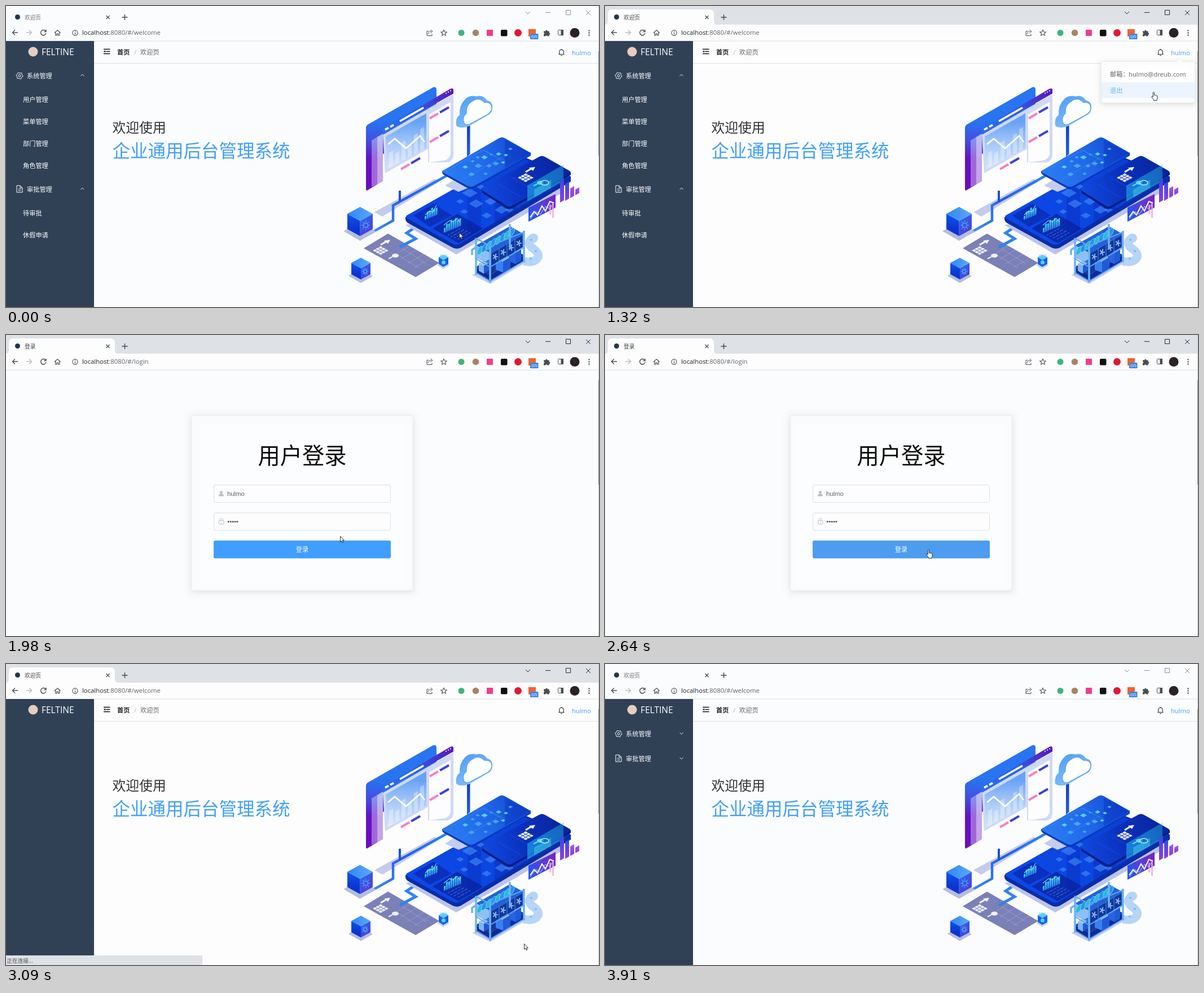
An HTML page with a canvas for the animation above (4010 ms loop, 1051 by 533 pixels).

```html
<!DOCTYPE html>
<html lang="zh-CN">
<head>
<meta charset="utf-8">
<title>欢迎页</title>
<style>
html, body { margin: 0; width: 100%; height: 100%; overflow: hidden; background: #fdfdfd; }
canvas { display: block; }
</style>
</head>
<body>
<canvas id="stage" width="1051" height="533"></canvas>
<script>
const ctx = document.getElementById('stage').getContext('2d');
const LOOP = 4010;
const CJK = '"Noto Sans CJK SC","Noto Sans CJK",sans-serif';
const LATIN = '"Open Sans","Noto Sans",sans-serif';
const ARIAL = '"Liberation Sans",sans-serif';
const USER = 'hulmo', MAIL = 'hulmo@dreub.com', BRAND = 'FELTINE';

// Pointer stops: time, x, y, shape (a = arrow, h = hand, '' = hidden)
const POINTER = [
  [0, 803, 401, 'a'], [150, 868, 330, 'a'], [280, 1031, 200, 'a'], [400, 904, 105, 'a'],
  [540, 965, 92, 'a'], [660, 1010, 80, 'h'], [940, 1004, 104, 'h'], [1080, 995, 118, 'h'],
  [1200, 982, 138, 'h'], [1320, 968, 152, 'h'], [1470, 962, 156, 'a'], [1620, 905, 205, 'a'],
  [1740, 800, 275, 'a'], [1860, 680, 330, 'a'], [1980, 592, 356, 'a'], [2100, 569, 380, 'h'],
  [2250, 573, 388, 'h'], [2400, 572, 386, 'h'], [2520, 570, 382, 'h'], [2640, 569, 380, 'h'],
  [2790, 602, 396, 'a'], [2940, 878, 468, 'a'], [3090, 918, 495, 'a'], [3210, 930, 517, 'a'],
  [3330, 0, 0, '']
];
const BUTTON = [[0, '#409eff'], [2100, '#66b1ff'], [2520, '#3a8ee6'], [2640, '#4c9cef'], [2790, '#409eff']];
const at = (table, t) => table.filter(row => row[0] <= t).pop();

function path(d, fill, stroke, width = 1) {
  const p = new Path2D(d);
  if (fill) { ctx.fillStyle = fill; ctx.fill(p); }
  if (stroke) { ctx.strokeStyle = stroke; ctx.lineWidth = width; ctx.stroke(p); }
}
const line = (d, color, width) => path(d, null, color, width);
function rect(x, y, w, h, fill, r = 0, stroke) {
  ctx.beginPath();
  ctx.roundRect(x, y, w, h, r);
  if (fill) { ctx.fillStyle = fill; ctx.fill(); }
  if (stroke) { ctx.strokeStyle = stroke; ctx.lineWidth = 1; ctx.stroke(); }
}
function ellipse(x, y, rx, ry, turn, fill, stroke, width = 1) {
  ctx.beginPath();
  ctx.ellipse(x, y, rx, ry, turn, 0, 7);
  if (fill) { ctx.fillStyle = fill; ctx.fill(); }
  if (stroke) { ctx.strokeStyle = stroke; ctx.lineWidth = width; ctx.stroke(); }
}
const circle = (x, y, r, fill, stroke, width) => ellipse(x, y, r, r, 0, fill, stroke, width);
function grad(x0, y0, x1, y1, ...colors) {
  const g = ctx.createLinearGradient(x0, y0, x1, y1);
  colors.forEach((c, i) => g.addColorStop(i / (colors.length - 1), c));
  return g;
}
function text(s, x, y, size, color, font = LATIN, weight = 400, align = 'left') {
  ctx.font = `${weight} ${size}px ${font}`;
  ctx.textAlign = align;
  ctx.fillStyle = color;
  ctx.fillText(s, x, y);
}
// Chinese text placed by its vertical centre
const han = (s, x, cy, size, color, weight, align) =>
  text(s, x, cy + size * 0.38, size, color, CJK, weight, align);
// Isometric tile from its left corner
const tile = (x, y, a, b, fill) =>
  path(`M${x} ${y}l${a} ${-a * .58}l${b} ${b * .58}l${-a} ${a * .58}z`, fill);
const pill = (x, y, w, color) => line(`M${x} ${y}l${w} ${-w * .58}`, color, 4);
function glow(blur, y, alpha, draw) {
  ctx.save();
  ctx.shadowColor = `rgba(0,0,0,${alpha})`;
  ctx.shadowBlur = blur;
  ctx.shadowOffsetY = y;
  draw();
  ctx.restore();
}

function browser(focused, bg, title, url) {
  const ink = focused ? '#24272b' : '#8b8f94', icon = '#4a4d51';
  rect(0, 0, 1051, 62, bg);
  if (focused) {
    rect(0, 0, 1051, 33, '#dee1e6');
    path('M0 33Q5 33 5 27V14Q5 6 13 6H185Q193 6 193 14V27Q193 33 199 33Z', bg);
  }
  circle(20.5, 19.5, 4.5, '#24364b');
  han(title, 33, 20, 9.7, focused ? '#3c4043' : '#6b6f74');
  line('M177.5 17l6 6m0-6l-6 6', '#44474b', 1.2);
  line('M205.5 20h10m-5-5v10', '#44474b', 1.4);
  line('M921 10l4 4 4-4M956 11.5h9M992.5 7.5h8v8h-8zM1028 8l8 8m0-8l-8 8', ink, 1);

  line('M21 47H11.5M16 42.5L11.5 47l4.5 4.5', icon, 1.4);
  line('M36 47h9.5M41 42.5l4.5 4.5-4.5 4.5', '#babcbe', 1.4);
  line('M70.2 44.5A4.7 4.7 0 1 0 71 48M71 42v3.6h-3.6', icon, 1.4);
  line('M86 47.5l5.3-4.7 5.3 4.7M87.8 46.5V52h2.3v-3h2.4v3h2.3v-5.5', icon, 1.2);
  circle(122.5, 47.5, 4.6, null, icon, 1.1);
  line('M122.5 47v3.2M122.5 44.8v1.2', icon, 1.2);
  text('localhost', 135, 51.3, 11.3, '#202124');
  const hostWidth = ctx.measureText('localhost').width;
  text(':8080/#/' + url, 135 + hostWidth, 51.3, 11.3, '#5f6368');

  line('M749 44.5h-3v8h9v-3M748 50q0-5 5-5h1M752.5 42l3.5 3-3.5 3', icon, 1);
  line('M776 42.4l1.5 3.4 3.7.3-2.8 2.4.9 3.6-3.3-2-3.3 2 .9-3.6-2.8-2.4 3.7-.3z', icon, 1.1);
  circle(807, 47.5, 5.5, '#3fb37f');
  circle(832.5, 47.5, 5.8, '#a88466');
  rect(852, 42, 11, 11, '#ef3d8c', 1);
  rect(877, 42, 11.5, 11.5, '#111', 2);
  circle(907.5, 47.5, 6.5, '#e01834');
  rect(926, 41, 13, 13, '#f2632a');
  rect(929, 49, 14.5, 10, '#3d86e8', 1);
  text('on', 936.2, 57, 8.5, '#fff', LATIN, 400, 'center');
  path('M953 44.5h3.2a1.7 1.7 0 1 1 3.4 0h3v3a1.7 1.7 0 1 1 0 3.4v2.6h-3.3a1.7 1.7 0 0 0-3.3 0h-3v-3.2a1.7 1.7 0 0 0 0-3.2z', icon);
  rect(978.5, 42.5, 9, 9, null, 1, icon);
  rect(983.5, 42, 4.5, 10, icon);
  circle(1008, 47.5, 8.5, '#2b2226');
  for (const y of [43.5, 47.5, 51.5]) circle(1033.5, y, 1.2, icon);
  rect(0, 61.5, 1051, 1, '#dcdfe4');
}

function monitor() {
  path('M638 215Q638 212 641 210L757 144Q763 142 763 149V210L668 262V310L641 326Q638 328 638 324Z',
    grad(0, 205, 0, 300, '#2874f1', '#4350e2', '#6214c6', '#6a0fc0'));
  path('M648 238L658 232V316L648 321Z', 'rgba(255,255,255,.36)');
  path('M658 232L668 226V310L658 316Z', 'rgba(255,255,255,.62)');
  path('M668 228L793 156V265Q792 275 782 277H748V253L672 296Z', '#cfd9f6');
  path('M750 192L788 170V262Q786 270 779 273L750 277Z', '#fdfdff');
  path('M668 217L787 147Q793 144 793 149V155L668 226Z', grad(668, 220, 793, 150, '#2a70f0', '#2f5ae6', '#5c14b8'));
  line('M672 219l6-3.4M681 214l6-3.4M698 204l42-24', '#fff', 3.6);
  for (let i = 0; i < 3; i++) circle(780 + i * 4, 154.5 - i * 2.2, 1.1, '#fff');
  path('M673 231L745 190V251L675 290Z', grad(710, 205, 710, 285, '#68a2f5', '#a8c9f9', '#d3e4fc'));
  [27, 20, 33, 22, 34, 39].forEach((h, i) => {
    const x = 679 + i * 11, y = 287 - i * 6;
    path(`M${x} ${y}v${-h}l7-4v${h}z`, 'rgba(255,255,255,.32)');
  });
  line('M677 245L689 235L709 252L734 230L742 241', '#fff', 2.6);
  for (const [x, y] of [[751, 199], [751, 241], [700, 289]]) {
    pill(x, y, 15, '#f57fbd');
    pill(x + 18, y - 10.5, 16, '#3b3fd6');
  }
}

function cloud() {
  path('M817 212h5.5V262L817 267Z', grad(817, 212, 823, 267, '#123fc4', '#1f62ea'));
  path('M798 212Q796 198 804 193Q803 176 813 166Q820 157 834 160Q846 157 852 167Q863 169 862 181Q862 190 853 194L820 213Q806 218 798 212Z',
    grad(800, 165, 830, 215, '#4c9df6', '#86c2fb'));
  path('M811 205Q809 196 816 190Q815 175 826 169Q838 160 848 171Q861 169 861 181Q860 189 850 194L822 209Q813 213 811 205Z', '#fdfeff', '#4b9af5', 1.1);
}

function cube(x, y, r, h) {
  const s = r * .55;
  tile(x - r - r * .3, y + h + s * .3, r * 1.25, r * 1.3, '#b5bddf');
  path(`M${x - r} ${y}L${x} ${y + s}V${y + s + h}L${x - r} ${y + h}Z`, grad(x, y, x, y + h, '#0d56ea', '#0a35d0'));
  path(`M${x + r} ${y}L${x} ${y + s}V${y + s + h}L${x + r} ${y + h}Z`, grad(x, y, x + r, y + h, '#2a6df0', '#4a3fd8'));
  path(`M${x - r} ${y}L${x} ${y - s}L${x + r} ${y}L${x} ${y + s}Z`, grad(x - r, y, x + r, y, '#2f86f4', '#5aaafa'));
  const gx = x + r * .45, gy = y + h * .75, k = r / 24;
  circle(gx, gy, 4.2 * k, null, '#4fb5f5', 1.3);
  for (let i = 0; i < 8; i++) {
    const a = i * Math.PI / 4, c = Math.cos(a) * k, d = Math.sin(a) * k;
    line(`M${gx + 5 * c} ${gy + 6 * d}L${gx + 8 * c} ${gy + 9 * d}`, '#4fa8f5', 1.2);
  }
}

// Grid, arrow and magnifier signs shared by two plates
function signs(x, y, lens) {
  for (let r = 0; r < 3; r++)
    for (let c = 0; c < 3; c++) tile(x + (c + r) * 5, y + (r - c) * 2.7, 4, 4, '#f2f4ff');
  line(`M${x + 14} ${y - 10}l10-6`, '#fff', 3);
  path(`M${x + 20} ${y - 17.5}l11-1.5-4 7z`, '#fff');
  ellipse(x + 40, y + 9, 6, 3.4, 0, lens);
  line(`M${x + 35} ${y + 11}l-7 3.5`, lens, 2);
}

function plates() {
  path('M708 388L798 440L985 331V314Z', '#bcc4ea');
  path('M708 374L905 262L1001 302V311L806 428Q798 432 790 427L712 384Q707 380 708 374Z', '#0a2da8');
  path('M710 371L900 264L1000 301L806 420Q798 425 790 420L711 376Q708 373 710 371Z', grad(710, 372, 1000, 300, '#0d48e8', '#0b46e0', '#0a36c6'));
  path('M722 371L758 350L790 371L751 391Z', '#0a30bc');
  path('M756 394L800 368L846 394L802 420Z', '#092bb0');
  path('M818 331L842 318V396L818 410Z', 'rgba(8,30,160,.28)');
  path('M866 320L905 335V360L866 383Z', 'rgba(8,30,160,.3)');
  for (const [x, y, a] of [[808, 331, 14], [833, 320, 8], [820, 350, 13], [848, 346, 11], [866, 361, 12], [843, 371, 9], [798, 346, 7], [884, 361, 8], [805, 364, 7]])
    tile(x, y, a, a, 'rgba(75,150,250,.55)');

  // Small glowing charts
  for (const [x, y, n, h] of [[742, 379, 6, 6], [776, 402, 8, 8]]) {
    for (let i = 0; i < n; i++) {
      const t = h + 7 * Math.sin(i * 3.1 / n) + (i % 2) * 3, bx = x + i * 3.9, by = y - i * 1.6;
      path(`M${bx} ${by}v${-t}l3-1.7v${t}z`, grad(bx, by - t, bx, by, '#45d3ee', '#2a7fe6'));
    }
  }
  line('M743 370l8-7 5 2 7-12M776 388l10-8 6 2 8-6 5 7', '#7fe6f5', 1.1);
  ctx.setLineDash([4, 2, 7, 2]);
  line('M783 406l22-12M788 409l24-13M794 411l24-13M801 413l22-12', 'rgba(160,190,255,.5)', 1);
  ctx.setLineDash([]);

  // Right plate
  path('M843 322L892 352L1001 294V299L897 358Q892 361 887 358L844 331Z', '#061d84');
  path('M845 321L945 267Q950 264 955 267L999 292Q1002 295 999 297L896 354Q892 356 888 354L845 327Q842 324 845 321Z', grad(848, 330, 990, 290, '#1148de', '#0a30bc', '#09259c'));
  line('M872 315l40 23M895 303l40 23', 'rgba(60,120,250,.3)', 1);
  path('M924 318L988 281V310L924 346Z', grad(924, 346, 988, 281, 'rgba(30,180,240,.62)', 'rgba(40,190,230,.4)'));
  path('M936 325l30-17v14l-30 17z', 'rgba(70,215,240,.45)');
  signs(907, 304, '#5fd9ee');
  ellipse(955, 313, 7, 4, 0, 'rgba(20,90,200,.5)', '#a5f0fa', 1.5);

  // Upper plate
  path('M778 318L797 306L822 321L802 329Z', '#c4ccef');
  path('M773 292L824 317L930 259V265L830 323Q825 326 819 323L776 299Q772 296 773 292Z', '#0a39bd');
  path('M775 291L874 234Q879 231 884 234L928 259Q931 262 928 264L829 319Q824 321 819 319L775 295Q772 293 775 291Z', grad(780, 300, 930, 255, '#2b7cf2', '#2068ea', '#0f44cc'));
  path('M884 236L928 261L884 287Z', 'rgba(8,40,180,.35)');
  line('M790 287l56 -32 40 20M812 306l66-38M846 255l33 19', 'rgba(90,170,255,.35)', 1);
  const tiles = [[809, 285, 5], [819, 298, 6], [830, 283, 7], [842, 268, 6], [851, 283, 5], [862, 279, 6], [868, 262, 5], [832, 268, 4], [846, 297, 4], [882, 264, 4], [857, 263, 3], [823, 275, 4], [877, 277, 4], [890, 253, 4]];
  tiles.forEach(([x, y, a], i) => tile(x, y, a, a, i % 3 ? '#45a4f6' : '#4fd2f3'));
}

function sideCharts() {
  [[982, 307, 39], [991, 313, 30], [1000, 321, 17], [1009, 323, 10]].forEach(([x, y, h], i) =>
    path(`M${x} ${y + 2}l7-4v${h}l-7 4z`, grad(x, y, x, y + h, i > 1 ? '#9a55e8' : '#3a48e4', '#8b3fe0')));
  path('M926 357L974 333V357L926 382Z', grad(926, 370, 974, 340, '#2157ee', '#5540dc', '#7a20c8'));
  line('M929 374l7-10 6 6 8-16 6 9 8-17 7 3', '#fff', 2);
  line('M929 377l10-13 8 5 9-14 8 4 7-12', 'rgba(190,205,255,.8)', 1.2);
  path('M963 352h3v17h-3zM968 350h3v25h-3z', 'rgba(242,166,218,.8)');
}

function links() {
  path('M653 365L760 306L768 311L667 373Z', '#c4cbec');
  line('M643 404L686 380V353L782 300', grad(643, 400, 782, 300, '#3a90f8', '#2360e4', '#2b84f4'), 4.5);
  line('M698 327V347', '#1d50d8', 4);
  path('M634 429L677 403L768 455L726 480Z', '#7b80b6');
  line('M688 441l43-25M700 448l39-23M712 456l41-24M724 463l38-22M703 430l42 26M690 438l42 26M715 422l42 26', 'rgba(220,225,255,.28)', 1);
  signs(650, 433, '#eef0ff');
  line('M698 427L726 412L710 402L728 390', '#2f82f2', 5);
}

function rack() {
  line('M935 410Q922 418 932 428Q950 440 940 449Q933 455 918 452', '#b7d4f9', 15);
  circle(935, 411, 8, '#b7d4f9');
  for (const [x, y] of [[931, 414], [939, 434], [930, 447]]) circle(x, y, 1.8, '#4fc8f2');
  path('M826 476L858 492L925 452L918 444Z', '#c3cdf0');
  path('M833 462L858 476V488L833 473ZM858 476L918 441V452L858 488Z', '#0b2c96');
  path('M833 462L893 428L918 441L858 476Z', '#15389f');
  // Boxes on the shelf
  for (const [x, y, w, h, c] of [[838, 456, 9, 13, '#7fb4f8'], [868, 446, 13, 21, '#3a80f0'], [893, 432, 10, 20, '#2b62e4']]) {
    path(`M${x} ${y}l${w} 5v${h}l${-w} -5z`, c);
    path(`M${x + w} ${y + 5}l${w} -6v${h}l${-w} 6z`, '#1f5ad8');
    tile(x, y, w, w * .9, '#9ccafa');
  }
  path('M833 424L893 390L918 404L860 438Z', '#2263da');
  path('M833 424L860 438V459L833 446Z', 'rgba(70,150,240,.6)');
  path('M860 438L918 404V426L860 459Z', '#10379c');
  for (let i = 0; i < 8; i++)
    ellipse(840 + i * 8, 433 - i * 4.6, 3.8, 8.5, .5, i % 2 ? '#2a8fec' : '#22bcd6', '#79dcf2');
  for (let i = 0; i < 4; i++) {
    const x = 867 + i * 14, y = 444 - i * 8;
    for (let k = 0; k < 5; k++) {
      const a = k * 1.257;
      line(`M${x} ${y}l${4.8 * Math.cos(a)} ${5.8 * Math.sin(a)}`, '#8fbcf6', 1.9);
    }
    line(`M${x + 7} ${y - 15}v22`, '#4f92f2', 1);
  }
  line('M826 441V432L833 427M833 411V476M858 425V490M918 398V454M893 386V430', '#6eb2f6', 3.5);
  line('M832 411L858 425L919 400M832 447L858 462L919 427M833 472L858 487L919 451', '#5da4f4', 2);
}

function illustration() {
  monitor();
  cloud();
  links();
  plates();
  sideCharts();
  cube(627.5, 368, 22.5, 27);
  cube(629, 455, 17, 20);
  tile(764, 459, 11, 11, '#c9d3f4');
  path('M767 445l8-4 9 4v12l-9 5-8-5z', '#1b5fe4');
  path('M767 445l8-4 9 4-9 5z', '#55cdf6');
  circle(775.5, 454, 3.6, '#43d7f0');
  path('M769 440h13v4h-13z', 'rgba(120,205,250,.5)');
  rack();
}

function gear(x, y) {
  let d = '';
  for (let i = 0; i < 24; i++) {
    const a = i * Math.PI / 12, r = i % 4 < 2 ? 6 : 4.7;
    d += `${i ? 'L' : 'M'}${x + r * Math.cos(a)} ${y + r * Math.sin(a)}`;
  }
  line(d + 'Z', '#fff', 1);
  circle(x, y, 2, null, '#fff');
}

function menu(open) {
  const second = open ? 324 : 167;
  const entry = (s, y) => {
    han(s, 37, y + .8, 11.2, '#fff');
    line(open ? `M132.5 ${y + 1}l3-3 3 3` : `M132.5 ${y - 1.5}l3 3 3-3`, '#e6e9ee', 1);
  };
  gear(24, 123.5);
  entry('系统管理', 123);
  line(`M19 ${second - 6}h6l4 4v8h-10zM25 ${second - 6}v4h4M21.5 ${second}h5M21.5 ${second + 3}h5`, '#fff', 1);
  entry('审批管理', second);
  if (!open) return;
  ['用户管理', '菜单管理', '部门管理', '角色管理'].forEach((s, i) => han(s, 30, 165.3 + i * 39.2, 11.2, '#fff'));
  han('待审批', 30, 366.3, 11.2, '#fff');
  han('休假申请', 30, 405.5, 11.2, '#fff');
}

function welcome(t) {
  rect(0, 62, 156, 471, '#304156');
  circle(48, 81, 8.5, '#e6cdbf');
  text(BRAND, 63, 86.8, 15.5, '#fff');
  if (t < 1470 || t >= 3480) menu(t < 1470);

  rect(156, 101, 895, 1, '#dddfe4');
  line('M173 76.5h11.5M177.5 80.5h7M173 84.5h11.5', '#111', 1.6);
  path('M173 80.5l3.2-2v4z', '#111');
  han('首页', 197, 81.5, 11.2, '#222529', 700);
  text('/', 227, 85.5, 11.2, '#b4b8c0');
  han('欢迎页', 238, 81.5, 11.2, '#606266');
  line('M979.5 85.8h10M980.8 85.5v-4.3a3.7 3.9 0 0 1 7.4 0v4.3M984.5 77.3v-1.3M983.2 87.8h2.6', '#222', 1.1);
  text(USER, 1003, 86.5, 11.2, '#409eff');

  han('欢迎使用', 188.5, 214.7, 23.8, '#303133');
  han('企业通用后台管理系统', 188.5, 256.3, 31.5, '#409eff');
  illustration();
  if (t >= 810 && t < 1470) dropdown(t);
  if (t >= 3090 && t < 3480) {
    rect(0, 516, 348, 17, '#dee1e6', [0, 3, 0, 0]);
    han('正在连接...', 1.5, 525, 9.6, '#44474b');
  }
}

function dropdown(t) {
  const opening = t < 940;
  if (opening) {
    rect(879, 97, 167, 71, '#fdfdfd');
  } else {
    glow(10, 2, .12, () => rect(879.5, 98.5, 166.5, 73, '#fff', 3, '#e8ebf2'));
    path('M1013 99l5.5-5.5 5.5 5.5z', '#fff');
    line('M1013 98.5l5.5-5 5.5 5', '#e8ebf2', 1);
  }
  const hot = t >= 1200 ? 1 : t >= 1080 ? 0 : -1;
  if (hot >= 0) rect(880, 107 + hot * 28, 166, 28, '#ecf5ff');
  const color = i => hot === i ? '#66b1ff' : '#606266';
  const y = opening ? 119.5 : 120.8;
  han('邮箱：', 895, y, 11.2, color(0));
  text(MAIL, 928, y + 4, 11.3, color(0));
  han('退出', 895, opening ? 147.5 : 149.5, 11.2, color(1));
}

function login(t) {
  glow(12, 2, .1, () => rect(328.5, 142.5, 392.5, 310, '#fcfdfe', 3, '#e9ecf2'));
  han('用户登录', 525, 213, 39.3, '#0a0a0a', 400, 'center');
  for (const y of [265.5, 315]) rect(368.5, y, 313, 31, '#fdfdfe', 3, '#dcdfe6');
  circle(381.5, 278.6, 2.5, '#b9bdc6');
  path('M377 285.5q0-4.5 4.5-4.5t4.5 4.5z', '#b9bdc6');
  text(USER, 392, 285.3, 11.3, '#606266', ARIAL);
  rect(377.5, 328.5, 8.5, 6.5, null, 1, '#b9bdc6');
  line('M379 328.5v-1.2a2.7 2.7 0 0 1 5.4 0v1.2M381.7 331v2', '#b9bdc6', 1);
  for (let i = 0; i < 5; i++) circle(394.3 + i * 3.9, 330.5, 1.6, '#5a5c60');
  rect(368, 364, 314, 31.5, at(BUTTON, t)[1], 3);
  han('登录', 525, 380, 11.2, '#fff', 400, 'center');
}

function pointer(t) {
  const [, x, y, shape] = at(POINTER, t);
  if (!shape) return;
  ctx.save();
  ctx.translate(x, y);
  ctx.lineJoin = 'round';
  if (shape === 'a')
    path('M.5 .5V10.4L2.8 8.3L4.3 11.8L5.9 11.1L4.4 7.7H7.4Z', '#fff', '#1b1b1b', .9);
  else
    path('M3.3 9V1.8Q3.3 .6 4.4 .6T5.5 1.8V6Q6.6 5.2 7.4 6.2Q8.5 5.6 9.2 6.7Q11 6.3 11 8V11.5Q11 13 10 14V15.3H4.6V14.2L1 9.6Q.4 8.3 1.5 8Q2.4 7.8 3.3 9Z', '#fff', '#1b1b1b', .9);
  ctx.restore();
}

function draw(t) {
  const atLogin = t >= 1470 && t < 3090;
  const focused = t >= 810 && t < 3910;
  const bg = focused ? '#fdfdfd' : '#fbfcfe';
  rect(0, 0, 1051, 533, atLogin ? '#fbfcfe' : bg);
  browser(focused, bg, atLogin ? '登录' : '欢迎页', atLogin ? 'login' : 'welcome');
  if (atLogin) login(t); else welcome(t);
  // Window edge
  rect(1050, 0, 1, 533, '#c6c8cc');
  rect(1050, 80, 1, 185, '#77797d');
  pointer(t);
}

const start = performance.now();
function tick() {
  draw((performance.now() - start) % LOOP);
  requestAnimationFrame(tick);
}
tick();
</script>
</body>
</html>
```
